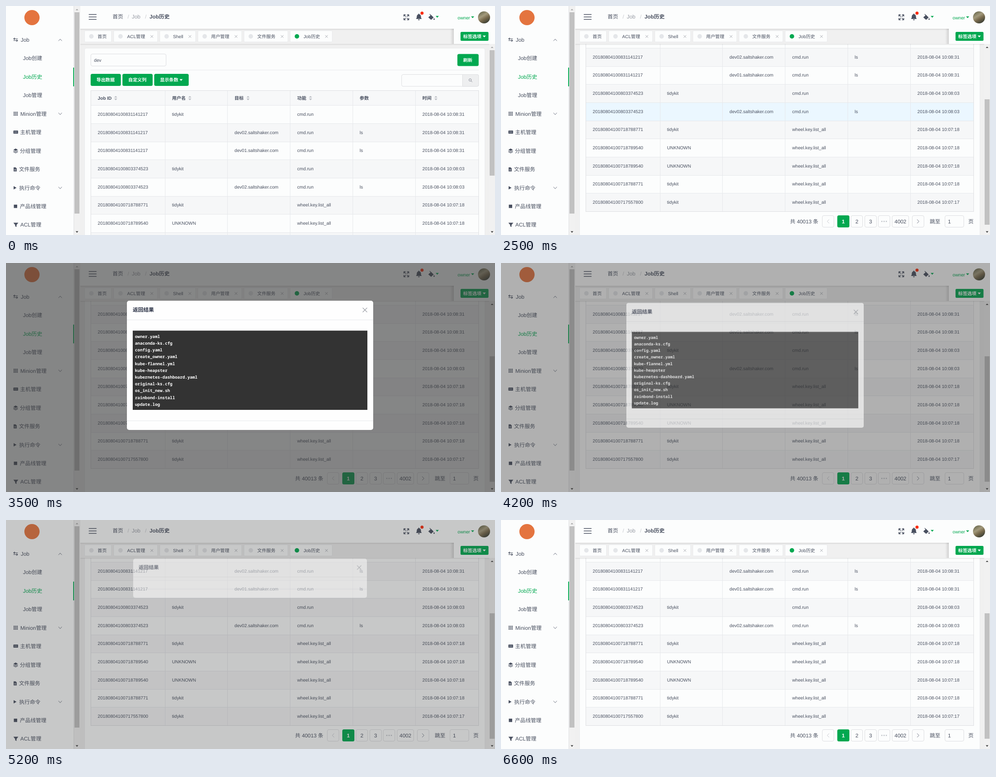
An HTML page that plays this animation: 1092 px wide and 513 px high, repeating every 7400 ms.

```html
<!DOCTYPE html>
<html lang="zh">
<head>
<meta charset="utf-8">
<title>Job历史</title>
<style>
html, body { margin: 0; width: 100%; height: 100%; overflow: hidden; background: #fcfdfd; }
svg { display: block; width: 1092px; height: 513px; }
text { font-family: "Liberation Sans", "Noto Sans CJK SC", "Noto Sans CJK", sans-serif; white-space: pre; text-rendering: geometricPrecision; }
.mono { font-family: "Noto Sans Mono", "DejaVu Sans Mono", monospace; }
.line { fill: none; stroke-linecap: round; stroke-linejoin: round; }

#page, #thumb, #upArrow, #row0, #row4, #mask, .modal { animation: 7400ms step-end infinite; }
#page { animation-name: scroll; }
#thumb { animation-name: thumb; }
#upArrow { animation-name: arrow; }
#row0 { animation-name: hoverFirst; }
#row4 { animation-name: hoverFifth; }
#mask { animation-name: mask; }
.modal { opacity: 0; transform-box: fill-box; transform-origin: center; }
#result { animation-name: result; }
#empty { animation-name: empty; }

@keyframes scroll {
  0% { transform: translateY(0); }
  22.97% { transform: translateY(-9px); }
  24.32% { transform: translateY(-72px); }
  25.67% { transform: translateY(-140px); }
  27.02%, 100% { transform: translateY(-169px); }
}
@keyframes thumb {
  0% { transform: translateY(0); }
  22.97% { transform: translateY(6px); }
  24.32% { transform: translateY(47px); }
  25.67% { transform: translateY(91px); }
  27.02%, 100% { transform: translateY(110px); }
}
@keyframes arrow { 0% { fill: #a3a3a3; } 22.97%, 100% { fill: #404040; } }
@keyframes hoverFirst { 0% { fill: #fcfdfd; } 22.97% { fill: #ebf7ff; } 33.78%, 100% { fill: #fcfdfd; } }
@keyframes hoverFifth { 0% { fill: #fcfdfd; } 33.78% { fill: #ebf7ff; } 47.29%, 100% { fill: #fcfdfd; } }
@keyframes mask {
  0% { opacity: 0; }
  43.24% { opacity: .25; }
  44.59% { opacity: .7; }
  45.94% { opacity: .95; }
  47.29% { opacity: 1; }
  56.75% { opacity: .65; }
  58.1% { opacity: .15; }
  59.45% { opacity: 0; }
  70.27% { opacity: .45; }
  71.62% { opacity: .9; }
  72.97% { opacity: 1; }
  78.37% { opacity: .94; }
  79.72% { opacity: .55; }
  81.08% { opacity: .12; }
  82.43%, 100% { opacity: 0; }
}
@keyframes result {
  0% { opacity: 0; transform: scale(.9); }
  43.24% { opacity: .34; transform: scale(.935); }
  44.59% { opacity: .8; transform: scale(.98); }
  45.94% { opacity: .97; transform: scale(.997); }
  47.29% { opacity: 1; transform: scale(1); }
  56.75% { opacity: .65; transform: scale(.965); }
  58.1% { opacity: .15; transform: scale(.915); }
  59.45%, 100% { opacity: 0; transform: scale(.9); }
}
@keyframes empty {
  0% { opacity: 0; transform: scale(.9); }
  70.27% { opacity: .5; transform: scale(.95); }
  71.62% { opacity: .9; transform: scale(.99); }
  72.97% { opacity: 1; transform: scale(1); }
  78.37% { opacity: .93; transform: scale(.991); }
  79.72% { opacity: .55; transform: scale(.955); }
  81.08% { opacity: .12; transform: scale(.912); }
  82.43%, 100% { opacity: 0; transform: scale(.9); }
}
</style>
</head>
<body>
<svg id="stage" viewBox="0 0 1092 513" xmlns="http://www.w3.org/2000/svg"></svg>
<script>
const GREEN = '#02a850', INK = '#495060', WHITE = '#fcfdfd', GREY = '#f0f0f0';
const EDGE = '#dddee1', SOFT = '#e6e8eb', MUTED = '#a6a9b0';
const SMALL = 10.2, MEDIUM = 11.85;

// y is the middle of the line of text; baselines sit on whole pixels
const text = (x, y, s, size = SMALL, fill = INK, extra = '') =>
  `<text x="${x}" y="${Math.round(y + size * .36)}" font-size="${size}" fill="${fill}" ${extra}>${s}</text>`;
const bold = (x, y, s, size, fill) => text(x, y, s, size, fill, 'font-weight="700"');
const rect = (x, y, w, h, fill, extra = '') =>
  `<rect x="${x}" y="${y}" width="${w}" height="${h}" fill="${fill}" ${extra}/>`;
const box = (x, y, w, h, fill = WHITE, stroke = EDGE, r = 3.5) =>
  rect(x + .5, y + .5, w - 1, h - 1, fill, `stroke="${stroke}" rx="${r}"`);
const dot = (x, y, r, fill) => `<circle cx="${x}" cy="${y}" r="${r}" fill="${fill}"/>`;
const shape = (d, fill = INK, extra = '') => `<path d="${d}" fill="${fill}" ${extra}/>`;
const line = (d, stroke = INK, w = 1) => `<path class="line" d="${d}" stroke="${stroke}" stroke-width="${w}"/>`;
const caret = (x, y, fill, r = 3.5) => shape(`M${x - r} ${y - r / 2}h${2 * r}l${-r} ${r + .5}z`, fill);
const upTri = (x, y, fill, r = 3, extra = '') => shape(`M${x - r} ${y + r / 2}h${2 * r}l${-r} ${-r}z`, fill, extra);
const cross = (x, y, r, stroke = MUTED, w = 1) =>
  line(`M${x - r} ${y - r}l${2 * r} ${2 * r}m0 ${-2 * r}l${-2 * r} ${2 * r}`, stroke, w);
const chevron = (x, y, dir) => line(`M${x - 3.5} ${y - 2 * dir}l3.5 ${4 * dir}l3.5 ${-4 * dir}`, '#6b7180');
const button = (x, y, w, h, s, pad) =>
  rect(x, y, w, h, GREEN, 'rx="3.5"') + bold(x + pad, y + h / 2, s, SMALL, '#fff');

function sideIcons() {
  let grid = '';
  for (let i = 0; i < 9; i++) grid += rect(17 + i % 3 * 3.4, 237 + Math.floor(i / 3) * 3.2, 2.3, 2.2, INK);
  return line('M17 73.5h9M19.5 71.5l-2.5 2l2.5 2M17 77.5h9M23.5 75.5l2.5 2l-2.5 2', INK, 1.1) + grid +
    rect(16.5, 279, 10.5, 7, INK, 'rx="1"') + line('M18.5 281.5h6.5M18.5 283.7h6.5', '#b9bdc4', .7) +
    shape('M16.5 322l5 -2.7l5 2.7l-5 2.7z') + line('M17 324.5l4.5 2.3l4.5 -2.3M17 327l4.5 2.2l4.5 -2.2', INK, 1.2) +
    shape('M17 361.5h4.5l2.5 2.5v6.5h-7z') + line('M18.5 366h4M18.5 368h4', WHITE, .7) +
    shape('M17 403.5l6.5 3.7l-6.5 3.7z') +
    rect(17.5, 445, 7.5, 7.5, INK) +
    shape('M16.5 485.5h11l-4 5v4.5l-3 -1.5v-3z');
}

function sidebar() {
  const items = [
    ['Job', 33], ['Job创建', 38], ['Job历史', 38], ['Job管理', 38], ['Minion管理', 32], ['主机管理', 31.5],
    ['分组管理', 31], ['文件服务', 29], ['执行命令', 29.5], ['产品线管理', 31], ['ACL管理', 32]
  ];
  const labels = items.map(([s, x], i) => text(x, 75.7 + i * 41.45, s, MEDIUM, i === 2 ? GREEN : INK)).join('');
  return rect(0, 0, 152, 513, WHITE) + rect(151, 0, 1, 513, EDGE) + dot(58, 26, 17, '#e4743f') +
    labels + sideIcons() +
    chevron(121, 76, -1) + chevron(121, 241.5, 1) + chevron(121, 407.5, 1) +
    rect(152, 0, 14, 513, '#f1f1f1') + rect(153, 14, 11, 451, '#c1c1c1') +
    rect(150, 138, 2, 42, GREEN) +
    upTri(158.5, 8, '#a3a3a3') + caret(158.5, 506, '#404040', 3);
}

function header() {
  const bell = shape('M922 17.3a1.3 1.3 0 0 1 1.3 1.4c2.6 .8 3.4 3 3.4 5.6c0 2.4 .7 3.5 1.8 4.7h-13c1.1 -1.2 1.8 -2.3 1.8 -4.7c0 -2.6 .8 -4.8 3.4 -5.6a1.3 1.3 0 0 1 1.3 -1.4zM920 30h4a2 2 0 0 1 -4 0z');
  const expand = line('M888.5 23v-3.5h3.5M896 19.5h3.5v3.5M899.5 27.5v3.5h-3.5M892 31h-3.5v-3.5M889 20l3.5 3.5M899 20l-3.5 3.5M899 30.5l-3.5 -3.5M889 30.5l3.5 -3.5', INK, 1.5);
  const bucket = line('M946.5 18.5l7 7', INK, 1.3) + shape('M949 20l6 5.7l-5.7 5.3l-6.3 -5.5zM956 27c2 2.6 1.8 4 0 4.2c-1.8 -.2 -2 -1.6 0 -4.2z');
  return rect(166, 0, 926, 51, WHITE) + line('M185.5 19h16M185.5 24.5h16M185.5 30h16', INK, 1.7) +
    text(238, 24, '首页', MEDIUM) + text(271.5, 24, '/', MEDIUM, '#c6c8cc') +
    text(281, 24, 'Job', MEDIUM, '#969aa3') + text(310.5, 24, '/', MEDIUM, '#c6c8cc') +
    bold(320.5, 24, 'Job历史', MEDIUM) +
    expand + bell + dot(929, 16, 3.5, '#fa2c0c') + bucket + caret(963, 24, GREEN) +
    text(1008.5, 26, 'owner', SMALL, GREEN) + caret(1042, 25, GREEN) + dot(1067.5, 25.5, 13.5, 'url(#photo)');
}

function tabs() {
  const list = [[175, 61, '首页', 204.5], [240, 99, 'ACL管理', 270.5], [343, 81, 'Shell', 373],
    [428, 99, '用户管理', 458], [531, 99, '文件服务', 561], [634, 95, 'Job历史', 664.5]];
  const tab = ([x, w, s, tx], i) => box(x, 55, w, 26, WHITE, '#e8eaec', 2) +
    dot(x + 15.7, 68, 5, i === 5 ? GREEN : '#e4e6e9') + text(tx, 68.3, s) +
    (i ? cross(x + w - 13.3, 68.3, 2.6) : '');
  return rect(166, 51, 926, 34, GREY) + rect(166, 51, 926, 4, 'url(#shade)') + list.map(tab).join('') +
    rect(992, 51, 8, 34, 'url(#sideShade)') + rect(1000, 51, 92, 34, WHITE) +
    rect(1015, 58, 62.5, 20, GREEN, 'rx="2.5"') + bold(1021, 68, '标签选项', SMALL, '#fff') + caret(1068, 68, '#fff');
}

const COLS = [189, 355, 494.5, 634.5, 774, 914, 1055];
const ROW = 40.66, TABLE = 189, BODY = 223.3;

function table() {
  const run = 'cmd.run', list = 'wheel.key.list_all', user = 'tidykit';
  const rows = [
    ['100831141217', user, '', run, '', '08:31'],
    ['100831141217', '', 'dev02.saltshaker.com', run, 'ls', '08:31'],
    ['100831141217', '', 'dev01.saltshaker.com', run, 'ls', '08:31'],
    ['100803374523', user, '', run, '', '08:03'],
    ['100803374523', '', 'dev02.saltshaker.com', run, 'ls', '08:03'],
    ['100718788771', user, '', list, '', '07:18'],
    ['100718789540', 'UNKNOWN', '', list, '', '07:18'],
    ['100718789540', 'UNKNOWN', '', list, '', '07:18'],
    ['100718788771', user, '', list, '', '07:18'],
    ['100717557800', user, '', list, '', '07:17']
  ];
  const bottom = BODY + ROW * rows.length;
  let out = rect(189, TABLE, 866, 34, '#f7f8f9');
  rows.forEach((r, i) => {
    const y = BODY + i * ROW;
    const cells = ['20180804' + r[0], ...r.slice(1, 5), '2018-08-04 10:' + r[5]];
    out += rect(189, y.toFixed(2), 866, ROW, i % 2 ? '#f6f7f8' : WHITE, `id="row${i}"`);
    cells.forEach((s, c) => { if (s) out += text(COLS[c] + 15.8, y + 19.1, s, 10.15); });
  });
  const sorts = [245, 410.5, 540.5, 680, 0, 960];
  ['Job ID', '用户名', '目标', '功能', '参数', '时间'].forEach((s, c) => {
    out += bold(COLS[c] + 15.8, 206.3, s);
    if (sorts[c]) out += upTri(sorts[c], 203.2, '#bbbec4', 3.5) + caret(sorts[c], 209, '#bbbec4', 3.5);
  });
  for (let i = 0; i < rows.length; i++) out += rect(189, Math.round(BODY + i * ROW) - 1, 866, 1, SOFT);
  COLS.slice(1, -1).forEach(x => out += rect(Math.floor(x), TABLE, 1, bottom - TABLE, SOFT));
  return out + box(189, TABLE, 867, Math.round(bottom - TABLE), 'none', EDGE, 0);
}

function pager() {
  const y = 638, mid = 651.5;
  const cell = (x, w, s, tx) => box(x, y, w, 27) + (s ? text(tx, mid, s, MEDIUM) : '');
  return text(645.5, mid, '共 40013 条', MEDIUM) + cell(717, 27) + line(`M732.5 ${mid - 4}l-4 4l4 4`, '#c3c6cc') +
    rect(751, y, 27, 27, GREEN, 'rx="3.5"') + bold(761, mid, '1', MEDIUM, '#fff') +
    cell(781, 27, '2', 791.5) + cell(812, 27, '3', 822) + cell(842, 27) +
    [850.5, 855.5, 860.5].map(x => dot(x, mid, 1.5, '#c3c6cc')).join('') +
    cell(873, 38, '4002', 878.8) + cell(918, 27) + line(`M929.5 ${mid - 4}l4 4l-4 4`, '#6b7180') +
    text(957.5, mid, '跳至', MEDIUM) + cell(991, 43, '1', 998) + text(1043.5, mid, '页', MEDIUM);
}

function content() {
  const card = box(175, 94, 895, 620, WHITE, '#e9eaec', 3.5);
  const tools = box(189, 107, 169, 28) + text(196.5, 121.2, 'dev') +
    button(1008, 107.5, 47.5, 27, '刷新', 13) + rect(189, 143, 867, 1, '#e9eaec') +
    button(189, 152, 67.5, 27, '导出数据', 13) + button(260, 152, 67.5, 27, '自定义列', 13) +
    button(331, 152, 77, 27, '显示条数', 13) + caret(391, 165.5, '#fff') +
    box(883, 153, 173, 27.5) + shape('M1019.5 153.5h32.5q3.5 0 3.5 3.5v19.5q0 3.5 -3.5 3.5h-32.5z', '#eeeff0', `stroke="${EDGE}"`) +
    `<circle cx="1036.5" cy="165.7" r="2.7" fill="none" stroke="#80848f"/>` + line('M1038.6 167.8l2.3 2.3', '#80848f');
  return rect(166, 85, 926, 428, GREY) +
    `<g clip-path="url(#view)"><g id="page">${card}${tools}${table()}${pager()}</g></g>` +
    rect(166, 85, 914, 3, 'url(#shade)') +
    rect(1079, 85, 13, 428, '#f1f1f1') + rect(1080, 99, 11, 281, '#c1c1c1', 'id="thumb"') +
    upTri(1085.5, 92.5, '#a3a3a3', 3, 'id="upArrow"') + caret(1085.5, 506, '#404040', 3);
}

function modal(id, height, inner) {
  const foot = 84.5 + height - 21;
  return `<g id="${id}" class="modal">` + rect(270, 84.5, 550, height, '#fefefe', 'rx="5"') +
    bold(283, 105, '返回结果', MEDIUM, '#2a3145') + cross(801.5, 105.3, 4.6, '#90949c', 1.2) +
    rect(270, 127, 550, 1, SOFT) + inner + rect(270, foot, 550, 1, SOFT) + '</g>';
}

const files = ['owner.yaml', 'anaconda-ks.cfg', 'config.yaml', 'create_owner.yaml', 'kube-flannel.yml', 'kube-heapster',
  'kubernetes-dashboard.yaml', 'original-ks.cfg', 'os_init_new.sh', 'rainbond-install', 'update.log'];
const output = rect(283, 151.5, 524, 177.5, '#333') +
  files.map((s, i) => text(288, 164.3 + i * 15.23, s, 9.3, '#fff', 'class="mono" font-weight="700"')).join('');

const stops = list => list.map(([at, color, alpha = 1]) =>
  `<stop offset="${at}" stop-color="${color}" stop-opacity="${alpha}"/>`).join('');
const defs = `<defs>
  <clipPath id="view"><rect x="166" y="85" width="914" height="428"/></clipPath>
  <linearGradient id="shade" x2="0" y2="1">${stops([[0, '#000', .1], [1, '#000', 0]])}</linearGradient>
  <linearGradient id="sideShade">${stops([[0, '#000', 0], [1, '#000', .13]])}</linearGradient>
  <linearGradient id="photo" x2=".6" y2="1">${stops([[0, '#56583f'], [.45, '#a39a7c'], [.7, '#77694c'], [1, '#3f4235']])}</linearGradient>
</defs>`;

document.getElementById('stage').innerHTML = defs + content() + tabs() + header() + sidebar() +
  rect(0, 0, 1092, 513, 'rgba(55,55,55,.6)', 'id="mask"') +
  modal('result', 289.5, output) + modal('empty', 92, '');
</script>
</body>
</html>
```
